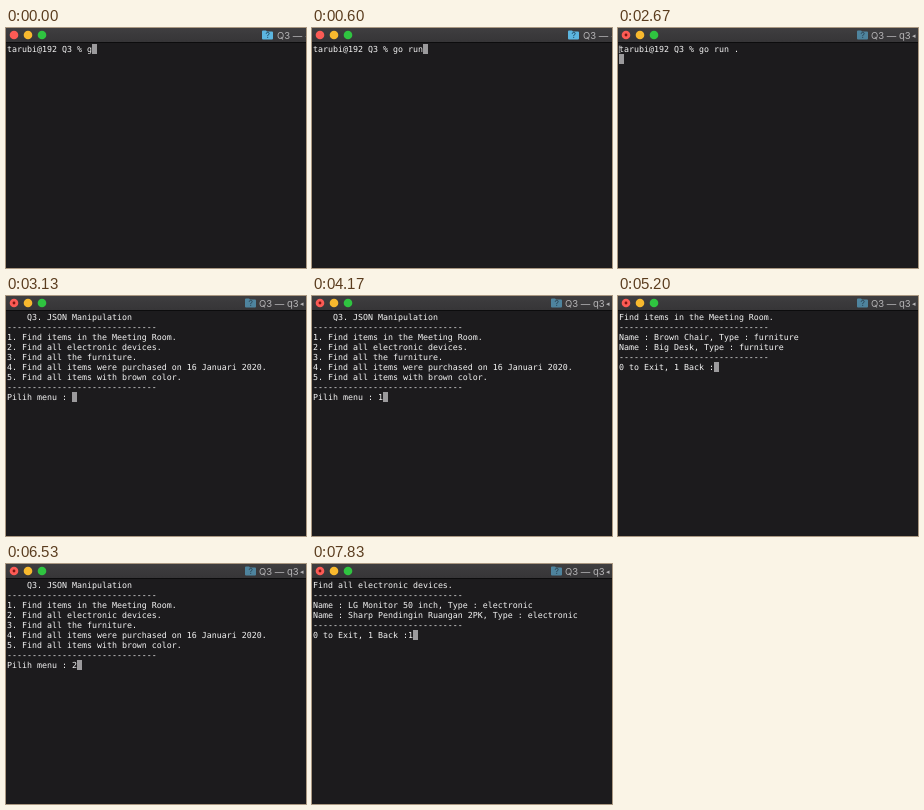
Recreate the animation shown at these times as an HTML page. Size 300 px wide and 240 px high, loop 8000 ms.

```html
<!DOCTYPE html>
<html lang="en">
<head>
<meta charset="utf-8">
<title>Terminal session</title>
<style>
  html, body { margin: 0; width: 100%; height: 100%; overflow: hidden; background: #1c1b1d; }
  #stage { position: relative; width: 300px; height: 240px; overflow: hidden; background: #1c1b1d; }
  #bar { position: absolute; inset: 0 0 auto; height: 14px; background: linear-gradient(#3f3e40, #363537); border-bottom: 1px solid #0c0c0d; }
  svg { position: absolute; left: 0; top: 0; }
  #title { position: absolute; top: 1px; font: 9.5px/13px Inter, sans-serif; color: #b4b3b5; white-space: pre; }
  #title small { position: absolute; left: 41px; top: 0; font: 7px/14px "DejaVu Sans", sans-serif; }
  pre { position: absolute; margin: 0; top: 16px; font: 8.306px/10px "DejaVu Sans Mono", monospace; color: #f4f4f4; text-rendering: geometricPrecision; }
  #text { left: 1px; }
  #mark { left: -1px; color: #b0b0b0; }
  #cursor { position: absolute; width: 5px; height: 10px; background: #9b9a9c; }
</style>
</head>
<body>
<div id="stage">
  <div id="bar"></div>
  <svg width="300" height="14">
    <circle cx="8" cy="7" r="4.3" fill="#fc5b55"/>
    <circle cx="22" cy="7" r="4.3" fill="#f8b92e"/>
    <circle cx="36" cy="7" r="4.3" fill="#2fc440"/>
    <circle id="dot" cx="8" cy="7" r="1.4" fill="#7c1510"/>
    <g id="folder">
      <path d="M0 3.5q0-1 1-1h3l1 1h5q1 0 1 1v6q0 1-1 1h-9q-1 0-1-1z" fill="#5cb6e0"/>
      <path d="M4.2 5.8q0-1.4 1.5-1.4t1.5 1.2q0 .9-1.5 1.8v.8m0 .9v.9" fill="none" stroke="#24506a"/>
    </g>
  </svg>
  <div id="title"><span id="name"></span><small id="arrow">◂</small></div>
  <pre id="mark">[</pre>
  <pre id="text"></pre>
  <div id="cursor"></div>
</div>
<script>
const $ = id => document.getElementById(id);
const LOOP = 8000, CELL = 5, ROW = 10;
const command = "go run .";
const keyTimes = [0, 30, 170, 330, 470, 600, 800, 1000];
const rule = "-".repeat(30);
const prompt = "tarubi@192 Q3 % ";

const menu = [
  "    Q3. JSON Manipulation", rule,
  "1. Find items in the Meeting Room.",
  "2. Find all electronic devices.",
  "3. Find all the furniture.",
  "4. Find all items were purchased on 16 Januari 2020.",
  "5. Find all items with brown color.",
  rule, "Pilih menu : "
].join("\n");

const result = (heading, type, ...names) => [
  heading, rule,
  ...names.map(n => `Name : ${n}, Type : ${type}`),
  rule, "0 to Exit, 1 Back :"
].join("\n");

const room = result("Find items in the Meeting Room.", "furniture", "Brown Chair", "Big Desk");
const devices = result("Find all electronic devices.", "electronic", "LG Monitor 50 inch", "Sharp Pendingin Ruangan 2PK");

// Screens after the command runs: [start, text, answer, time of answer]
const screens = [
  [1530, prompt + command + "\n", "", 0],
  [3000, menu, "1", 4000],
  [5000, room, "1", 5800],
  [6000, menu, "2", 6530],
  [6770, devices, "1", 7830]
];

function screenText(t) {
  const screen = screens.findLast(s => t >= s[0]);
  if (!screen) return prompt + command.slice(0, keyTimes.filter(k => k <= t).length);
  const [, text, answer, at] = screen;
  return t >= at ? text + answer : text;
}

function draw(t) {
  const text = screenText(t), lines = text.split("\n");
  $("text").textContent = text;
  $("cursor").style.left = 1 + CELL * lines.at(-1).length + "px";
  $("cursor").style.top = 16 + ROW * (lines.length - 1) + "px";
  $("mark").hidden = t < 1530 || t >= 3000;

  const running = t >= 1630;
  const busy = Math.min(1, Math.max(0, (t - 1900) / 200));
  const x = running ? 253 : 271;
  $("title").style.left = x + "px";
  $("name").textContent = "Q3 — " + (!running ? "-zsh" : t < 2670 ? "go" : "q3");
  $("arrow").hidden = !running;
  $("folder").setAttribute("transform", `translate(${x - (running ? 14 : 15)})`);
  $("folder").setAttribute("opacity", 1 - 0.4 * busy);
  $("dot").setAttribute("opacity", busy);
}

function tick(now) {
  draw(now % LOOP);
  requestAnimationFrame(tick);
}
draw(0);
requestAnimationFrame(tick);
</script>
</body>
</html>
```
